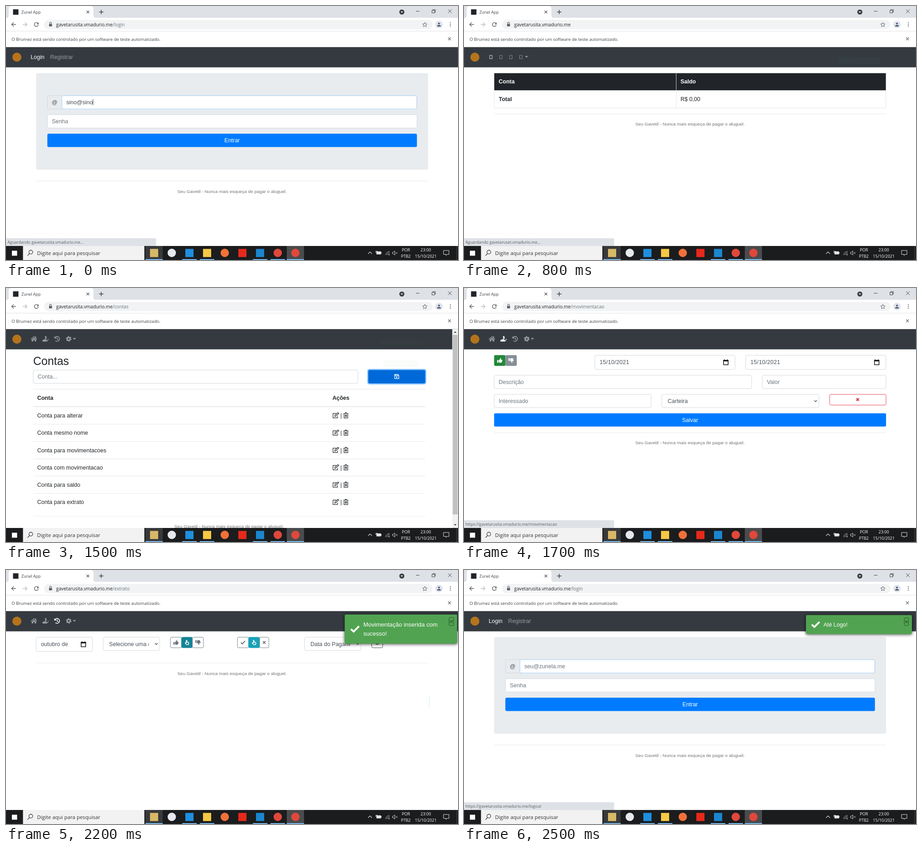
An HTML page for the animation above (2600 ms loop, 998 by 561 pixels).

```html
<!DOCTYPE html>
<html lang="pt-BR">
<head>
<meta charset="utf-8">
<style>
html, body { margin: 0; width: 100%; height: 100%; overflow: hidden; background: #fff; }
svg { display: block; }
text { font-family: "Liberation Sans", Arial, sans-serif; font-size: 12.48px; fill: #212529; }
.ui, .ui text { font-family: "Open Sans", "Noto Sans", sans-serif; }
.toast { filter: drop-shadow(0 1px 4px rgba(0, 0, 0, .75)); }
</style>
</head>
<body>
<svg id="stage" width="998" height="561" viewBox="0 0 998 561">
  <g id="page"></g>
  <g id="frame" class="ui"></g>
  <g id="live" class="ui"></g>
</svg>
<script>
const HOST = 'gavetarusita.vmadurio.me';
const API = 'gavetaruset.vmadurio.me';
const LOOP = 2600, STEP = 100;
const INK = '#212529', FIELD = '#495057', HINT = '#6c757d', LINE = '#ced4da', DIM = '#999c9f';

const rect = (x, y, w, h, fill, more = '') =>
  `<rect x="${x}" y="${y}" width="${w}" height="${h}" fill="${fill}" ${more}/>`;
const circle = (x, y, r, fill, more = '') => `<circle cx="${x}" cy="${y}" r="${r}" fill="${fill}" ${more}/>`;
const label = (x, y, s, fill = INK, more = '') => `<text x="${x}" y="${y}" style="fill:${fill};${more}">${s}</text>`;
const small = (x, y, s, size, fill = '#3c4043', more = '') => label(x, y, s, fill, `font-size:${size}px;${more}`);
const middle = (x, y, s, fill, more = '') => label(x, y, s, fill, 'text-anchor:middle;' + more);
const stroke = (d, color, w = 1.2, more = '') =>
  `<path d="${d}" fill="none" stroke="${color}" stroke-width="${w}" ${more}/>`;
const shape = (d, fill) => `<path d="${d}" fill="${fill}"/>`;
const at = (x, y, s, more = '') => `<g transform="translate(${x} ${y}) ${more}">${s}</g>`;
const cross = (x, y, r, color, w = 1.2) =>
  stroke(`M${x - r} ${y - r}l${2 * r} ${2 * r}M${x + r} ${y - r}l${-2 * r} ${2 * r}`, color, w);

// Icons, each centred on the origin
const icon = {
  home: c => shape('M-7.2 .4L0-6 2.8-3.5V-5.4H4.8V-1.8L7.2 .4 6.3 1.4 0-4.1-6.3 1.4ZM-5 1.6L0-2.7 5 1.6V5.6H1.5V2H-1.5V5.6H-5Z', c),
  hand: c => shape('M-6.8 2.2H-4.6Q-2.5 .4-.6 1.2H2Q3 2.2 1.6 3H4L6-.1Q7.6 .2 6.6 1.6L4 5.2Q3.5 5.8 2.5 5.8H-6.8Z', c) +
    stroke('M2.2-5Q-1-6-.9-4.2T1.3-2.8 1.2-.7-1-1.1M.7-6.6V.1', c, 1.2),
  history: c => stroke('M-4.4-3A5.3 5.3 0 1 1-3.6 3.9M.2-3V.5L2.6 2', c, 1.6) + shape('M-6.2-5.8V-.8H-1.2Z', c),
  gear: c => circle(0, 0, 3.3, 'none', `stroke="${c}" stroke-width="2.8"`) +
    circle(0, 0, 5.1, 'none', `stroke="${c}" stroke-width="2" stroke-dasharray="2.7 2.64"`),
  caret: c => shape('M-3.6-1.8H3.6L0 1.8Z', c),
  thumb: c => shape('M-5.6-1H-3V5H-5.6ZM-2-.8L.8-3.2Q1-5.8 2.2-5.4 3.6-4.6 2.4-1.6H5.2Q6.4-.8 5.4 .4 5.8 1.6 4.9 2.3 5 3.6 4.2 3.9 4 5 2.8 5.1H0L-2 4.2Z', c),
  point: c => stroke('M-1.6 1V-4Q-1-5.4 0-4V-.6H2.4Q4.2-.4 4 1.8L3.2 4.8H-1L-4 1.4Q-3.6 .2-1.6 1.6', c, 1.5),
  tick: c => stroke('M-4.6 .2l3 3L4.6-3.4', c, 2.1),
  save: c => stroke('M-4.6-4.6H2.4L4.6-2.4V4.6H-4.6ZM-2.5-4.4V-1.4H2V-4.4', c, 1.3) + circle(0, 1.6, 1.5, c),
  edit: c => stroke('M1.4-4.2H-6V5.4H4V1.4M-2.2 2.2l.3-2.4L5-6.2 6.8-4.4-.1 2Z', c, 1.2),
  trash: c => stroke('M-5.4-4.2H5.4M-2-4.4L-1.2-6H1.2L2-4.4M-4.2-4V5.7H4.2V-4M-1.7-1.8V3.4M0-1.8V3.4M1.7-1.8V3.4', c, 1.1),
  calendar: c => stroke('M-5-4.2H5V5.4H-5Z', c, 1.5) + rect(-5.6, -5, 11.2, 3, c) + rect(-4, -6.4, 1.6, 2, c) + rect(2.4, -6.4, 1.6, 2, c),
  chevron: c => stroke('M-3-1.5L0 1.5 3-1.5', c, 1.3),
  reload: c => stroke('M3.6-2.8A4.4 4.4 0 1 0 4.3 1', c, 1.4) + shape('M5-5V-.6H.6Z', c)
};
const put = (name, x, y, color, more) => at(x, y, icon[name](color), more);

const box = (x, y, w, h, border = LINE, fill = '#fff', more = '') =>
  rect(x, y, w, h, fill, `rx="3" stroke="${border}" stroke-width=".9" ${more}`);
const field = (x, y, w, value, color = FIELD) => box(x, y, w, 29.4) + label(x + 10, y + 19.1, value, color);
const select = (x, y, w, value) => box(x, y, w, 29.4) +
  `<svg x="${x + 10}" y="${y}" width="${w - 34}" height="29">${label(3, 19.3, value, FIELD)}</svg>` +
  put('chevron', x + w - 7.5, y + 14.7, '#343a40');
const dateField = (x, w, value) => box(x, 148.5, w, 31.4) +
  label(x + 10.6, 168, value, FIELD, /\d/.test(value) ? 'letter-spacing:.32px' : '') + put('calendar', x + w - 20.3, 164, '#111');
const button = (x, y, w, text, focused) =>
  (focused ? rect(x - 2.4, y - 2.4, w + 4.8, 34.2, '#80c0ff', 'rx="5"') : '') +
  rect(x, y, w, 29.4, focused ? '#0069d9' : '#007bff', 'rx="3"') + middle(x + w / 2, y + 19, text, '#fff');
const footer = (y, x = 499) => rect(x - 432.5, y, 865.5, .8, '#e5e5e5') +
  middle(x, y + 26.4, 'Seu Gavetil - Nunca mais esqueça de pagar o aluguel.', '#6f7478', 'font-size:9.98px');

function navbar({ active = -1, tofu = false, guest = false }) {
  let s = rect(0, 91, 998, 44.5, '#343a40') + circle(24, 113, 10, '#b5741c');
  if (guest) return s + label(54.4, 117, 'Login', '#fff') + label(97.4, 117, 'Registrar', DIM);
  if (tofu) {
    for (let i = 0; i < 4; i++) s += rect(56.7 + 22 * i, 109, 5.5, 7.6, 'none', `stroke="${i ? DIM : '#fff'}" stroke-width=".8"`);
    return s + put('caret', 138, 112.4, DIM);
  }
  ['home', 'hand', 'history', 'gear'].forEach((name, i) => {
    s += put(name, 61.7 + 25.6 * i, 112.4, i === active ? '#fff' : DIM);
  });
  return s + put('caret', 151, 112.4, DIM);
}

const pages = {
  login({ email = '', password = '', focus = 'email' }) {
    return navbar({ guest: true }) + rect(66.5, 148.3, 865.5, 213.2, '#e9ecef', 'rx="3.7"') +
      box(91.5, 198, 816, 29.4, LINE, '#e9ecef') + middle(107.4, 217, '@', FIELD) +
      box(123.5, 198, 783.5, 29.4, focus === 'email' ? '#9dcbfb' : LINE) +
      label(133.2, 216.8, email || 'seu@zunela.me', email ? FIELD : HINT) +
      (email && focus === 'email' ? rect(191.6, 206, .9, 13, '#222') : '') +
      box(91.5, 240, 816, 29.4, focus === 'password' ? '#80bdff' : LINE) +
      label(101.2, 258.9, password || 'Senha', password ? FIELD : HINT) +
      button(91.3, 282, 816, 'Entrar', focus === 'button') + footer(386.2);
  },
  home({ tofu }) {
    const bold = 'font-weight:bold';
    return navbar({ active: 0, tofu }) + rect(66.8, 148.4, 864.6, 77, '#fff', 'stroke="#dee2e6" stroke-width=".9"') +
      rect(66.8, 148.4, 864.6, 37.8, INK) + rect(468, 148.4, .9, 77, '#dee2e6') +
      label(76.6, 171.4, 'Conta', '#fff', bold) + label(478, 171.4, 'Saldo', '#fff', bold) +
      label(76.8, 210.4, 'Total', INK, bold) + label(478, 210.4, 'R$ 0,00') + footer(238);
  },
  accounts({ focus }) {
    const bold = 'font-weight:bold';
    const rows = ['para alterar', 'mesmo nome', 'para movimentacoes', 'com movimentacao', 'para saldo', 'para extrato'];
    let s = navbar({}) + label(60, 169.8, 'Contas', INK, 'font-size:24.96px') +
      field(60, 181.2, 717, 'Conta...', HINT) + button(800, 181.2, 125.6, '', focus) + put('save', 862.8, 195.6, '#fff') +
      rect(60, 223, 865.5, .8, '#dee2e6') + rect(60, 261.3, 865.5, 1.4, '#dee2e6') +
      label(69, 247, 'Conta', INK, bold) + label(720.8, 247, 'Ações', INK, bold);
    rows.forEach((name, i) => {
      const y = 281.4 + 38.25 * i;
      s += label(69, y + 4.6, 'Conta ' + name) + put('edit', 728, y, INK) + label(738.3, y + 4.6, '|') + put('trash', 750.5, y, INK);
      if (i) s += rect(60, y - 19.2, 865.5, .8, '#dee2e6');
    });
    return s + footer(503.6, 492.5) + rect(985.3, 91, 13, 439, '#f1f1f1') + rect(986.4, 103.5, 10.6, 396.5, '#c1c1c1') +
      shape('M988.8 99h6l-3-3.5ZM988.8 521.5h6l-3 3.5Z', '#505050');
  },
  entry({ filled = 0, focus }) {
    const value = (x, y, w, text, hint, ready) => field(x, y, w, ready ? text : hint, ready ? FIELD : HINT);
    return navbar({ active: 1 }) +
      rect(66.5, 148.3, 25, 23.6, '#218838', 'rx="2.4"') + rect(91.5, 148.3, 25, 23.6, '#868e96', 'rx="2.4"') +
      put('thumb', 79, 160, '#fff') + put('thumb', 104, 160, '#fff', 'scale(1 -1)') +
      dateField(288.8, 309.7, '15/10/2021') + dateField(622, 309.7, '15/10/2021') +
      value(66.6, 192.8, 568.5, 'Transação de Exemplo', 'Descrição', filled > 0) +
      value(658.7, 192.8, 273, '900.50', 'Valor', filled > 0) +
      value(66.6, 234.9, 346.6, 'Qualquer Pessoa', 'Interessado', filled > 1) +
      select(436.8, 234.9, 347, 'Carteira') +
      box(807.3, 234.9, 124.5, 23.6, '#dc3545') + cross(869.2, 246.4, 2.8, '#dc3545', 2.2) +
      button(66.5, 276.7, 865.4, 'Salvar', focus) + footer(319);
  },
  statement() {
    const group = (x, widths, names, tint) => widths.map((w, i) => {
      const left = x + widths.slice(0, i).reduce((a, b) => a + b, 0), on = i === 1;
      const color = on ? '#fff' : HINT, cx = left + w / 2;
      const mark = names[i] === 'cross' ? cross(cx, 160, 2.9, color, 2)
        : names[i] === 'down' ? put('thumb', cx, 160, color, 'scale(1 -1)') : put(names[i], cx, 160, color);
      return box(left, 148.4, w, 23.4, on ? tint : HINT, on ? tint : '#fff') + mark;
    }).join('');
    return navbar({ active: 2 }) + dateField(66.6, 124.6, 'outubro de') +
      select(214.6, 148.4, 124.8, 'Selecione uma conta') +
      group(363, [24.6, 24, 24.4], ['thumb', 'point', 'down'], '#138496') +
      group(511, [24.6, 24.4, 20.4], ['tick', 'point', 'cross'], '#17a2b8') +
      select(659.2, 148.4, 124.8, 'Data do Pagamento') + box(807.4, 148.4, 24.4, 23.4, '#343a40') +
      put('reload', 819.6, 160, '#343a40') + footer(205.2) + rect(934.2, 279, .8, 25, '#bdecef');
  }
};

function toast({ lines, scale = 1, opacity = 1, drop = 0 }) {
  const h = lines.length > 1 ? 64.6 : 44.8, cy = 98.2 + h / 2;
  const first = lines.length > 1 ? 125.2 : 125.4;
  const body = rect(747.2, 98.2, 249.6, h, '#51a351', 'rx="3"') +
    stroke(`M761 ${cy}l6 5.6L779 ${cy - 6.4}`, '#fff', 4) +
    lines.map((line, i) => label(788.5, first + 19.6 * i, line, '#fff', 'font-size:13.26px')).join('') +
    rect(978.8, 104.6, 10, 18, 'none', 'rx="2" stroke="#294f29" stroke-width="1"') + cross(983.8, 113.8, 3, '#294f29', 1.3);
  return `<g class="toast" opacity="${opacity}" transform="translate(872 ${cy + drop}) scale(${scale}) translate(-872 ${-cy})">${body}</g>`;
}

function drawFrame() {
  const gray = '#5f6368', tray = '#e6e6e6';
  let s = rect(0, 0, 998, 26.5, '#dee1e6') + rect(0, 26, 998, 65, '#fff') +
    shape('M0 26.5Q6 26.5 6 20.5V6Q6 0 12 0H187Q193 0 193 6V20.5Q193 26.5 199 26.5Z', '#fff') +
    rect(15.5, 7.3, 12, 12, '#20232a') + small(34, 17, 'Zunel App', 9) + cross(180.8, 13.2, 2.9, '#3c4043') +
    stroke('M205.5 13.3h9.6M210.3 8.5v9.6', '#3c4043', 1.4) + circle(874, 13.3, 5.6, '#3c4043') + shape('M871.4 12h5.2l-2.6 3Z', '#fff') +
    stroke('M905 11.6h8M940.5 9.7h5.8v5.6h-5.8ZM942.2 9.5V8h5.8v5.6h-1.6', '#333', .9) + cross(980, 11.5, 4, '#333', .9) +
    stroke('M22 40.8H12.8M17 36.3l-4.5 4.5 4.5 4.5', gray, 1.4) + stroke('M37 40.8h9.4M42 36.3l4.5 4.5-4.5 4.5', '#bdc1c6', 1.4) +
    put('reload', 67, 41, gray) + rect(84, 30.8, 858, 20.4, '#f1f3f4', 'rx="10.2"') +
    rect(95, 39.5, 6.6, 5.6, gray, 'rx=".8"') + stroke('M96.3 39.5v-1.6a2 2 0 0 1 4 0v1.6', gray, 1.1) +
    stroke('M924.8 36l1.4 3.4 3.6.3-2.7 2.4.8 3.6-3.1-1.9-3.1 1.9.8-3.6-2.7-2.4 3.6-.3Z', gray, 1) +
    circle(956, 41, 8.3, '#dfe3ec') + circle(956, 38.8, 2, '#48536a') + shape('M951.8 45.2q0-3.2 4.2-3.2t4.2 3.2Z', '#48536a') +
    [37, 40.8, 44.6].map(y => circle(981, y, 1.1, gray)).join('') +
    rect(0, 55, 998, .8, '#dadce0') + rect(0, 90.2, 998, .8, '#c8cacc') +
    small(12.3, 76.6, 'O Brumez está sendo controlado por um software de teste automatizado.', 9.58) + cross(979.2, 72.6, 3.1, gray);

  s += rect(0, 530, 998, 31, '#1b1c1e') + rect(13, 540.5, 11.5, 11, '#fff') + rect(37.5, 530, 268, 31, '#f2f2f2') +
    circle(54.8, 543.6, 4.2, 'none', 'stroke="#222" stroke-width="1.1"') + stroke('M51.8 546.8l-4.2 4.6', '#222', 1.2) +
    small(68.6, 550.4, 'Digite aqui para pesquisar', 11.46, '#333');
  const apps = ['#d8b967', '#e5e9ee', '#1f8fdf', '#f6c945', '#f0713a', '#e6291b', '#1b86cf', '#e0483b', '#e0483b'];
  const round = [1, 4, 7, 8], open = [0, 2, 3, 6, 7, 8];
  apps.forEach((color, i) => {
    const x = 327 + 39 * i, wide = i === 0 || i === 8;
    if (wide) s += rect(x - 19, 530, 38, 31, i ? '#4a4b4d' : '#38393b');
    if (open.includes(i)) s += rect(x - (wide ? 19 : 16), 559, wide ? 38 : 32, 2, '#76b9ed');
    s += round.includes(i) ? circle(x, 545.3, 9.2, color) : rect(x - 9, 536.5, 18, 18, color);
  });
  s += stroke('M799.3 547.4l4.4-4.4 4.4 4.4', tray, 1.1) + rect(818, 542, 10, 6.6, tray) + rect(828, 544, 1.2, 2.6, tray) +
    stroke('M816.5 541.5h3.5v3.5h-3.5Z', tray, .9) +
    stroke('M838 550a9 9 0 0 1 9-8M840.6 550a6.4 6.4 0 0 1 6.4-5.6M843.2 550a3.8 3.8 0 0 1 3.8-3.2', '#aaa', 1) + circle(846, 549.5, 1, tray) +
    stroke('M853.5 543.6h2l3-2.6v9l-3-2.6h-2Z', tray, .9) + cross(862.5, 545.5, 1.8, tray, .9) +
    [[883, 542.4, 'POR'], [882.8, 556, 'PTB2'], [926.8, 542, '23:00'], [927, 556, '15/10/2021']]
      .map(([x, y, t]) => small(x, y, t, 9, '#fff', 'text-anchor:middle')).join('') +
    stroke('M966 540h12v8.6h-4.4l-2 2.4v-2.4H966Z', tray, 1) + rect(994.6, 530, .8, 31, '#56585a');
  document.getElementById('frame').innerHTML = s;
}

const live = ({ path = '', status }) =>
  small(110.8, 44.6, `${HOST}<tspan fill="${HINT}" style="fill:${HINT}">${path}</tspan>`, 10.2, '#202124') +
  (status ? shape('M0 513H328.5Q331.5 513 331.5 516V530H0Z', '#dee1e6') + small(3.3, 525.2, status, 8.82, '#5a5d61') : '');

// Each scene starts at its step and holds until the next one
const user = 'sino@sino', secret = '••••••';
const waiting = host => `Aguardando ${host}...`;
const link = name => `https://${HOST}/${name}`;
const welcome = ['Bem vindo!'], reset = ['Dados resetados com sucesso!'], added = ['Conta inserida com sucesso!'];
const inserted = ['Movimentação inserida com', 'sucesso!'];
const login = { page: 'login', path: '/login' }, home = { page: 'home' };
const accounts = { page: 'accounts', path: '/contas' }, statement = { page: 'statement', path: '/extrato' };
const entry = { page: 'entry', path: '/movimentacao', status: link('movimentacao') };
const scenes = [
  [0, { ...login, email: user, status: waiting(HOST) }],
  [1, { ...login, email: user, password: secret, focus: 'password', status: waiting(HOST) }],
  [2, { ...login, email: user, password: secret, focus: 'button', status: waiting(API) }],
  [8, { ...home, tofu: true, status: waiting(API), toasts: [{ lines: welcome, scale: .37, opacity: .04 }] }],
  [9, { ...home, toasts: [{ lines: welcome }] }],
  [11, { ...home, toasts: [{ lines: welcome, scale: .97 }] }],
  [12, { ...home, toasts: [{ lines: reset, scale: .905 }] }],
  [13, { ...home, toasts: [{ lines: reset }] }],
  [14, { ...accounts, toasts: [{ lines: reset }] }],
  [15, { ...accounts, focus: true, toasts: [{ lines: reset, scale: .37, opacity: .02 }, { lines: added, scale: .31, opacity: .02, drop: 46 }] }],
  [16, { ...accounts, focus: true, toasts: [{ lines: added }] }],
  [17, entry],
  [18, { ...entry, filled: 1 }],
  [19, { ...entry, filled: 2, focus: true }],
  [20, { ...entry, focus: true, toasts: [{ lines: inserted, scale: .9 }] }],
  [21, { ...statement, toasts: [{ lines: inserted, scale: .97 }] }],
  [22, { ...statement, toasts: [{ lines: inserted, scale: .995 }] }],
  [24, statement],
  [25, { ...login, status: link('logout'), toasts: [{ lines: ['Até Logo!'], scale: .9375 }] }]
];

let shown;
function render(time) {
  const step = Math.floor((time % LOOP) / STEP);
  const scene = scenes.filter(([from]) => from <= step).pop()[1];
  if (scene === shown) return;
  shown = scene;
  document.getElementById('page').innerHTML = pages[scene.page](scene) + (scene.toasts || []).map(toast).join('');
  document.getElementById('live').innerHTML = live(scene);
}

drawFrame();
const start = performance.now();
function tick() {
  render(performance.now() - start);
  requestAnimationFrame(tick);
}
tick();
</script>
</body>
</html>
```
